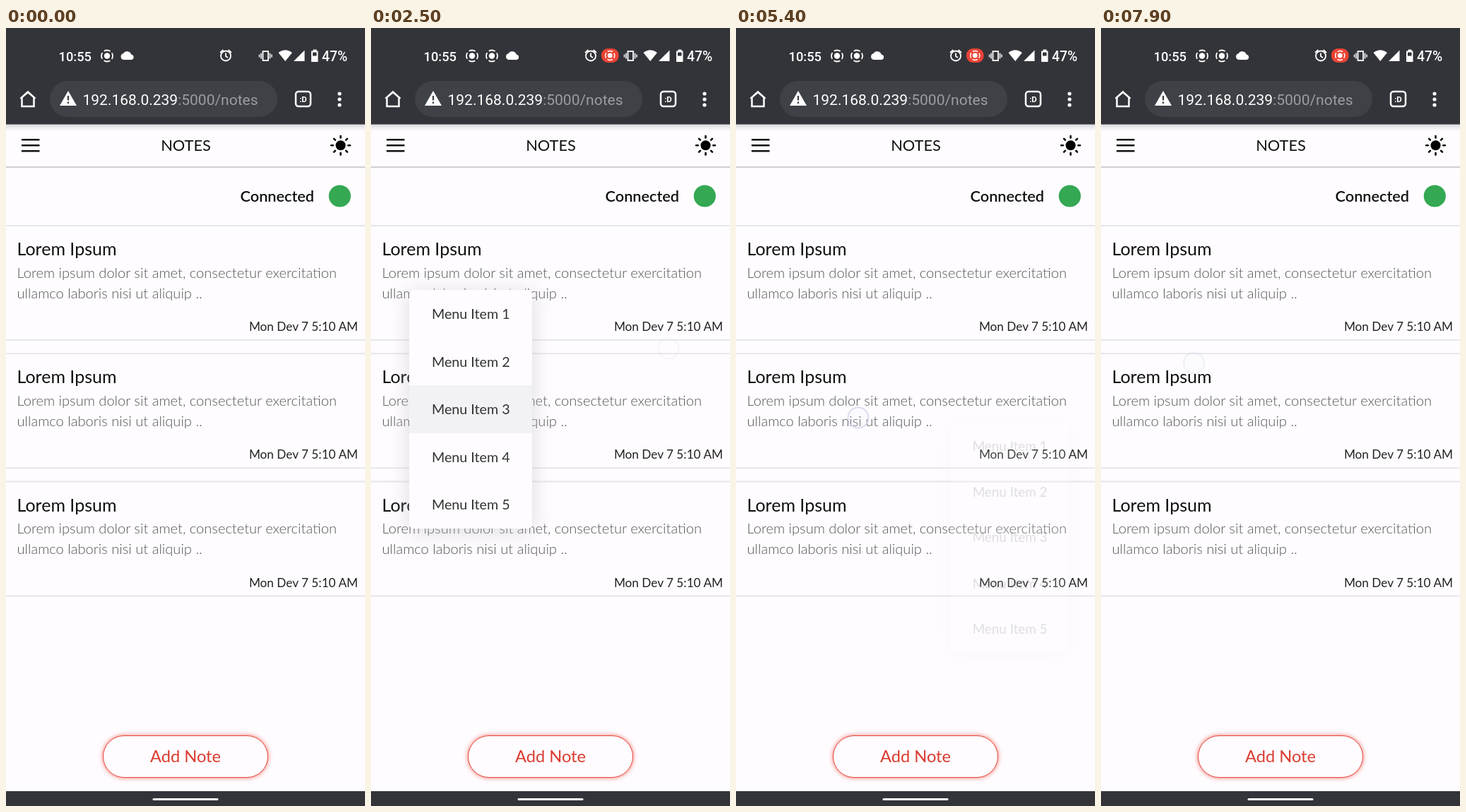
An HTML page for the animation above (8 s loop, 508 by 1102 pixels).

```html
<!DOCTYPE html>
<html lang="en">
<head>
<meta charset="utf-8">
<title>Notes</title>
<style>
html, body { margin: 0; width: 100%; height: 100%; overflow: hidden; background: #fefcff; }
#stage { position: relative; width: 508px; height: 1102px; overflow: hidden; font-family: Lato, sans-serif; }
svg { position: absolute; left: 0; top: 0; }
.sys { font-family: Roboto, sans-serif; fill: #fff; }
.title { font-size: 25px; fill: #111; }
.body { font-size: 20.1px; font-weight: 300; fill: #555; }
.date { font-size: 17.2px; fill: #222; }
.line { stroke: #e7e6ea; stroke-width: 2; }
.menu { position: absolute; border-radius: 6px; background: #fefcff; transform-origin: 0 0;
  box-shadow: 0 4px 28px rgba(188, 188, 194, .5); color: #333; font-size: 19.7px; opacity: 0; }
.menu div { height: 67.6px; line-height: 67px; padding-left: 32px; }
.menu div:first-child { border-radius: 6px 6px 0 0; }
#touch { position: absolute; box-sizing: border-box; width: 31px; height: 31px; border-radius: 50%;
  border: 2px solid #d3d4e8; background: rgba(225, 226, 245, .15); }
#button { position: absolute; left: 137px; top: 1002px; width: 234px; height: 60px; box-sizing: border-box;
  border: 1.5px solid #e4483c; border-radius: 30px; box-shadow: 0 0 6px rgba(240, 70, 55, .75);
  color: #da3b2f; font-size: 23.6px; line-height: 56px; text-align: center; background: #fefcff; }
</style>
</head>
<body>
<div id="stage">
  <svg width="508" height="1102">
    <defs>
      <linearGradient id="shade" x2="0" y2="1">
        <stop stop-color="#d9d8dc"/><stop offset="1" stop-color="#fefcff"/>
      </linearGradient>
      <g id="record" fill="none" stroke="#fff" stroke-width="1.8">
        <circle r="8" stroke-dasharray="9.4 3.17" stroke-dashoffset="4.7"/>
        <circle r="4.2" fill="#fff" stroke="none"/>
      </g>
    </defs>
    <rect width="508" height="1102" fill="#fefcff"/>
    <rect y="136" width="508" height="10" fill="url(#shade)"/>
    <rect width="508" height="136.5" fill="#333439"/>
    <rect y="1081" width="508" height="21" fill="#333439"/>
    <path d="M209 1092.5H299" stroke="#fff" stroke-width="3" stroke-linecap="round"/>

    <!-- status bar -->
    <g class="sys" font-weight="500">
      <text x="74.5" y="46.5" font-size="18.3">10:55</text>
      <text x="447" y="46.5" font-size="19.3">47%</text>
    </g>
    <use href="#record" x="143" y="39.5"/>
    <use href="#record" id="second" x="171" y="39.5"/>
    <path id="cloud" fill="#fff" d="M-5 6a4.6 4.6 0 0 1-.5-9A6.3 6.3 0 0 1 5.8-1.5 3.8 3.8 0 0 1 6 6Z"/>
    <g id="badge">
      <rect x="326" y="29" width="24.5" height="20" rx="9" fill="#ea4335"/>
      <use href="#record" transform="translate(338.2 39) scale(.82)"/>
    </g>
    <g fill="none" stroke="#fff" stroke-width="1.8">
      <circle cx="311" cy="39.5" r="7"/>
      <path d="M311 35.5V40l3 2M303 35l4.4-4M319 35l-4.4-4"/>
      <rect x="363.5" y="33" width="7.5" height="13"/>
      <path d="M361 35.5v8M358.5 37.5v4M373.5 35.5v8M376 37.5v4" stroke-width="1.5"/>
    </g>
    <path fill="#fff" d="M385.5 35q9.7-7.5 19.4 0L395.2 47ZM422.5 31.5V47H407Z"/>
    <path fill="#fff" fill-rule="evenodd" d="M434.5 30.5h5v2h2V48h-9.500V32.500h2.500ZM434 34.500v5h5.500v-5Z"/>

    <!-- address bar -->
    <rect x="62" y="75" width="322" height="51" rx="25.500" fill="#3e4146"/>
    <path d="M22.500 98v13h17V98L31 91ZM20.500 100 31 90.500 41.500 100" fill="none" stroke="#fff" stroke-width="2.500"/>
    <path d="M88 89 100 110H76Z" fill="#fff"/>
    <path d="M88 96v6.500M88 104.500v2.500" stroke="#3e4146" stroke-width="2.300"/>
    <text class="sys" x="108.500" y="108.500" font-size="21">192.168.0.239<tspan fill="#9b9da1">:5000/notes</tspan></text>
    <rect x="410" y="90" width="21" height="21" rx="4" fill="none" stroke="#fff" stroke-width="2.500"/>
    <text class="sys" x="420.500" y="104.500" font-size="11.500" font-weight="700" text-anchor="middle">:D</text>
    <path d="M472 93v0M472 101v0M472 109v0" stroke="#fff" stroke-width="5.200" stroke-linecap="round"/>

    <!-- page header -->
    <path d="M22 158.300H47.500M22 166.300H47.500M22 174.300H47.500" stroke="#111" stroke-width="2.600"/>
    <text x="254.500" y="173.500" font-size="21.800" text-anchor="middle" fill="#111">NOTES</text>
    <g id="sun" transform="translate(473.500 166.300)"><circle r="7" fill="#000"/></g>
    <path d="M0 197H508" stroke="#c2c1c5" stroke-width="1.500"/>
    <text x="436" y="245.500" font-size="21.700" font-weight="600" text-anchor="end" fill="#111">Connected</text>
    <circle cx="472.300" cy="238" r="15.600" fill="#34a853"/>
    <g id="cards"></g>
  </svg>
  <div id="button">Add Note</div>
  <div id="menus"></div>
  <div id="touch"></div>
</div>
<script>
const $ = id => document.getElementById(id);

for (let a = 0; a < 360; a += 45) {
  $('sun').innerHTML += `<path d="M10.800 0H13.300" transform="rotate(${a})" stroke="#000" stroke-width="2.600" stroke-linecap="round"/>`;
}

for (let i = 0; i < 3; i++) {
  $('cards').innerHTML += `<g transform="translate(0 ${280 + i * 181.300})">
    <path class="line" d="M0 0H508M0 162H508"/>
    <text class="title" x="15.500" y="42">Lorem Ipsum</text>
    <text class="body" x="15.500" y="73.500">Lorem ipsum dolor sit amet, consectetur exercitation</text>
    <text class="body" x="15.500" y="102.500">ullamco laboris nisi ut aliquip ..</text>
    <text class="date" x="498" y="149" text-anchor="end">Mon Dev 7 5:10 AM</text></g>`;
}

// shrink: how much the menu scales down while hidden; lit: [row, colour, from, to]
const menus = [
  { x: 54, y: 371, w: 174, open: 820, close: 2850, shrink: .05,
    lit: [[0, '#d8d7da', 1150, 1870], [2, '#f2f1f4', 1740, 3100]] },
  { x: 218, y: 506, w: 216, open: 1770, close: 2250, shrink: 0, prefix: 'Sub-', lit: [] },
  { x: 304, y: 560, w: 174, open: 3480, close: 5230, shrink: .05, lit: [[0, '#d4d3d6', 3750, 5150]] },
  { x: 252, y: 723, w: 174, open: 6150, close: 7700, shrink: .05, lit: [] }
];
for (const m of menus) {
  m.el = document.createElement('div');
  m.el.className = 'menu';
  m.el.style.cssText = `left:${m.x}px;top:${m.y}px;width:${m.w}px`;
  for (let n = 1; n <= 5; n++) m.el.innerHTML += `<div>${m.prefix || ''}Menu Item ${n}</div>`;
  $('menus').append(m.el);
}

// x, y, finger down, finger up
const touches = [
  [54, 371, 280, 900], [116, 544, 1650, 1810], [421, 454, 2140, 2270], [421, 454, 2740, 2850],
  [304, 560, 2980, 3560], [173, 552, 5130, 5340], [252, 723, 5620, 6230], [131.500, 474.500, 7190, 7710]
];

const FADE = 200, TOUCH_FADE = 280;
const clamp = v => Math.max(0, Math.min(1, v));

function draw(t) {
  const recording = t >= 300;
  $('badge').style.display = $('second').style.display = recording ? '' : 'none';
  $('cloud').setAttribute('transform', `translate(${recording ? 200 : 171.500} 39)`);

  for (const m of menus) {
    const shown = Math.min(clamp((t - m.open) / FADE), clamp(1 - (t - m.close) / FADE));
    m.el.style.opacity = shown;
    m.el.style.transform = `scale(${1 - m.shrink * (1 - shown)})`;
    for (const [row, colour, from, to] of m.lit) {
      m.el.children[row].style.background = t >= from && t < to ? colour : '';
    }
  }

  const now = touches.filter(p => t >= p[2]).pop();
  const ring = $('touch').style;
  ring.opacity = now ? clamp(1 - (t - now[3]) / TOUCH_FADE) : 0;
  if (now) ring.transform = `translate(${now[0] - 15.500}px, ${now[1] - 15.500}px)`;
  ring.left = ring.top = 0;
}

(function tick() {
  draw(performance.now() % 8000);
  requestAnimationFrame(tick);
})();
</script>
</body>
</html>
```
